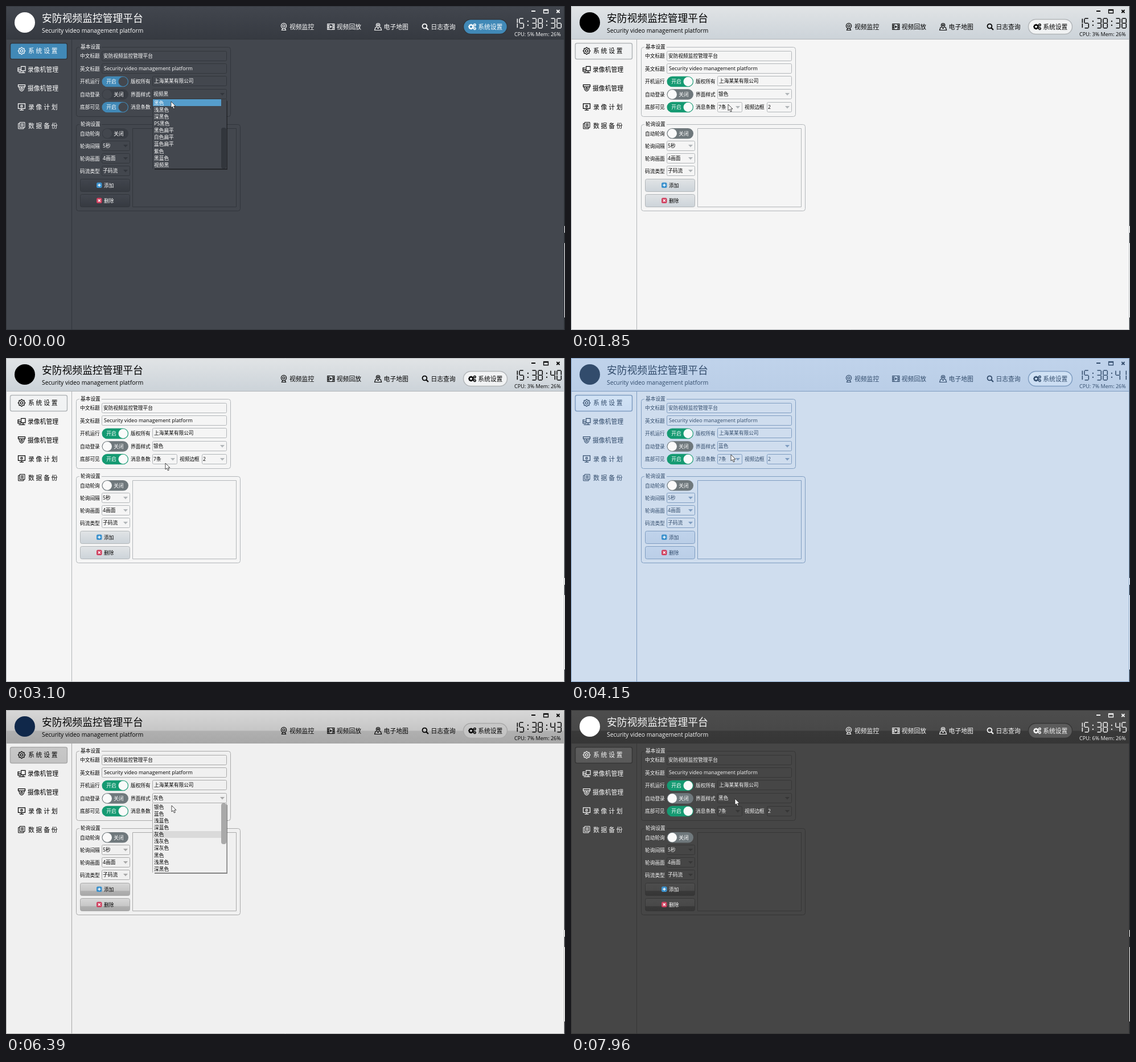
An HTML page with a canvas for the animation above (8000 ms loop, 982x570 px).

```html
<!DOCTYPE html>
<html lang="zh-CN">
<head>
<meta charset="utf-8">
<title>安防视频监控管理平台</title>
<style>
html, body { margin: 0; width: 100%; height: 100%; overflow: hidden; }
canvas { display: block; }
</style>
</head>
<body>
<canvas id="stage" width="982" height="570"></canvas>
<script>
const g = document.getElementById('stage').getContext('2d');
const LOOP = 8000, TAU = Math.PI * 2;
const FONT = '"Open Sans", "Noto Sans CJK SC", "Noto Sans CJK", sans-serif';
const STYLES = ['银色', '蓝色', '浅蓝色', '深蓝色', '灰色', '浅灰色', '深灰色', '黑色', '浅黑色',
  '深黑色', 'PS黑色', '黑色扁平', '白色扁平', '蓝色扁平', '紫色', '黑蓝色', '视频黑'];

// bar: header and button gradient, sel: selected item gradient
const base = { on: '#159a72', off: '#6f787c', knob: '#fafafa' };
const THEMES = {
  video: { name: '视频黑', text: '#ffffff', panel: '#43474e', line: '#32363c', bar: ['#42464e', '#363a41'],
    sel: ['#4189b7', '#4189b7'], hover: '#559dcc', logo: '#ffffff',
    on: '#4189b7', off: '#383c43', knob: '#43474e' },
  silver: { ...base, name: '银色', text: '#000000', panel: '#f5f5f5', line: '#b2b6b9', bar: ['#e1e4e6', '#ccd3d9'],
    sel: ['#f2f3f4', '#f0f2f3'], hover: '#e1e4e6', logo: '#000000' },
  blue: { ...base, name: '蓝色', text: '#324c6c', panel: '#cfddee', line: '#7f9dc1', bar: ['#c0d3eb', '#bacee7'],
    sel: ['#d2e3f5', '#cadcf2'], hover: '#dae8f7', logo: '#324c6c' },
  sky: { ...base, name: '浅蓝色', text: '#386487', panel: '#eaf7ff', line: '#c0dcf2', bar: ['#def0fe', '#c0def6'],
    sel: ['#def0fe', '#d4eafb'], hover: '#f2f9ff', logo: '#386487' },
  gray: { ...base, name: '灰色', text: '#000000', panel: '#f0f0f0', line: '#a9a9a9',
    bar: ['#d8d8d8', '#c6c6c6', '#b0b0b0', '#a8a8a8'],
    sel: ['#c8c8c8', '#c2c2c2'], hover: '#dadada', logo: '#10284a' },
  black: { ...base, name: '黑色', text: '#f6f6f6', panel: '#464646', line: '#363636',
    bar: ['#4d4d4d', '#484848', '#393939', '#363636'],
    sel: ['#5c5c5c', '#595959'], hover: '#5c5c5c', logo: '#ffffff' }
};

// each visit to the style list: opened, picked, style chosen
const VISITS = [[-500, 1580, 'silver'], [2130, 2980, 'blue'], [3490, 3900, 'sky'], [4550, 5580, 'gray'], [6250, 7420, 'black']];
const APPLY = 260, MOVE = 250, ROW = 12.15;
// pointer stops: arrival time, x, y
const STOPS = [[0, 290, 168], [1030, 287, 208], [1330, 276, 173], [2100, 280, 158], [2600, 280, 185], [3400, 282, 158],
  [3850, 281, 194], [4150, 281, 170], [4500, 290, 158], [5000, 296, 215], [6200, 291, 168], [6960, 290, 253], [7960, 288, 156]];
const CPU = [[0, 5], [1160, 3], [3610, 7], [7420, 6]];

let th;

const clamp = (v, lo, hi) => Math.max(lo, Math.min(hi, v));
const ease = p => p * p * (3 - 2 * p);

function mouse(t) {
  let [, x, y] = STOPS[0];
  for (const [end, tx, ty] of STOPS) {
    const p = ease(clamp((t - end) / MOVE + 1, 0, 1));
    x += (tx - x) * p;
    y += (ty - y) * p;
  }
  return [x, y];
}

function skin(t) {
  const done = VISITS.filter(v => v[1] + APPLY <= t).pop();
  return THEMES[done ? done[2] : 'video'];
}

function text(s, x, y, size = 8.7, color = th.text, align = 'left') {
  g.font = `${size}px ${FONT}`;
  g.textAlign = align;
  g.fillStyle = color;
  g.fillText(s, x, y + size * 0.37);
}

function fade(y0, y1, cols) {
  const gr = g.createLinearGradient(0, y0, 0, y1);
  const stops = cols.length > 2 ? [0, 0.62, 0.64, 1] : [0, 1];
  cols.forEach((c, i) => gr.addColorStop(stops[i], c));
  return gr;
}

function rect(x, y, w, h, color) {
  g.fillStyle = color;
  g.fillRect(x, y, w, h);
}

function round(x, y, w, h, r, color) {
  g.fillStyle = color;
  g.beginPath();
  g.roundRect(x, y, w, h, r);
  g.fill();
}

function box(x0, y0, x1, y1, r, fill, line, w = 1) {
  g.beginPath();
  g.roundRect(x0 + 0.5, y0 + 0.5, x1 - x0 - 1, y1 - y0 - 1, r);
  if (fill) { g.fillStyle = fill; g.fill(); }
  if (line) { g.strokeStyle = line; g.lineWidth = w; g.stroke(); }
}

function disc(x, y, r, color) {
  g.fillStyle = color;
  g.beginPath();
  g.arc(x, y, r, 0, TAU);
  g.fill();
}

function ring(x, y, r, w = 1.2) {
  g.lineWidth = w;
  g.beginPath();
  g.arc(x, y, r, 0, TAU);
  g.stroke();
}

function path(d, w = 1.2) {
  g.lineWidth = w;
  g.stroke(new Path2D(d));
}

// closed wavy ring with n teeth
function gear(x, y, r, n, w) {
  g.lineWidth = w;
  g.beginPath();
  for (let i = 0; i < n * 6; i++) {
    const a = i / (n * 6) * TAU, d = r * (1 + 0.14 * Math.cos(a * n));
    g.lineTo(x + d * Math.cos(a), y + d * Math.sin(a));
  }
  g.closePath();
  g.stroke();
}

const ICONS = {
  webcam() { ring(0, -1.5, 4.6); ring(0, -1.5, 2); path('M-2 3L-3.5 6H3.5L2 3'); },
  film() {
    path('M-6 -5H6V5H-6ZM-3.5 -5V5M3.5 -5V5M-6 -1.7H-3.5M-6 1.7H-3.5M3.5 -1.7H6M3.5 1.7H6');
    g.fill(new Path2D('M-1.5 -2.5L2 0L-1.5 2.5Z'));
  },
  map() { path('M0 3C-5 -2 -3.5 -6 0 -6S5 -2 0 3ZM-3 1H-4.5L-6 6H6L4.5 1H3'); ring(0, -2.6, 1.3); },
  search() { ring(-1, -1, 3.9, 1.8); path('M2 2L5.5 5.5', 2.2); },
  gears() { gear(-2.2, 0, 3.4, 8, 2.1); gear(4.2, -3.2, 1.8, 6, 1.3); gear(4.2, 3.2, 1.8, 6, 1.3); },
  gear() { gear(0, 0, 5.4, 8, 1.2); ring(0, 0, 2.2); },
  recorder() { path('M-1 -5.5H6.5V2H-1ZM-3 -3H-6.5V3H-1M-6.5 0H-1M-5 5.5H6M2.5 2V5.5'); },
  dome() { path('M-6 -6H6V-2.5H-6ZM-4.5 -2.5C-4.5 7.5 4.5 7.5 4.5 -2.5'); ring(0, 0.8, 1.6); },
  monitor() { path('M-6 -5.5H6V3H-6ZM-3.5 5.7H3.5M0 3V5.7'); ring(0, -1.2, 1.6); },
  copy() { path('M-3.5 -5.5H5.5V3.5H-3.5ZM-3.5 -3.5H-5.8V5.7H3.5V3.5M-1.5 -3H3.5M-1.5 -1H3.5M-1.5 1H3.5', 1); }
};

function icon(name, x, y) {
  g.save();
  g.translate(x, y);
  g.strokeStyle = g.fillStyle = th.text;
  ICONS[name]();
  g.restore();
}

// segments: top, upper left, upper right, middle, lower left, lower right, bottom
const SEGS = ['M.6 0H6.8', 'M0 .6V7.9', 'M7.4 .6V7.9', 'M.6 8.5H6.8', 'M0 9.1V16.4', 'M7.4 9.1V16.4', 'M.6 17H6.8'];
const DIGITS = ['012456', '25', '02346', '02356', '1235', '01356', '013456', '025', '0123456', '012356'];

function clock(str) {
  g.strokeStyle = th.text;
  [...str].forEach((ch, i) => {
    g.save();
    g.translate(890.9 + 11 * i, 21.8);
    if (ch === ':') for (const y of [4, 11]) rect(3, y, 2, 2, th.text);
    else for (const s of DIGITS[ch]) path(SEGS[s], 1.5);
    g.restore();
  });
}

function field(x0, x1, y, s, inset = 3, size) {
  box(x0, y - 9, x1, y + 9, 2, null, th.line);
  text(s, x0 + inset, y, size);
}

function combo(x0, x1, y, s) {
  field(x0, x1, y, s, 2);
  g.fillStyle = th.line;
  g.beginPath();
  g.moveTo(x1 - 12, y - 2);
  g.lineTo(x1 - 4, y - 2);
  g.lineTo(x1 - 8, y + 2.5);
  g.fill();
}

function toggle(y, on) {
  round(168.5, y - 9.3, 46.5, 18.6, 9.3, on ? th.on : th.off);
  disc(on ? 205.7 : 177.8, y, 8.2, th.knob);
  text(on ? '开启' : '关闭', on ? 185 : 198, y, 8.7, '#ffffff', 'center');
}

function group(x1, y0, y1, title) {
  box(123, y0, x1, y1, 4, null, th.line);
  rect(129, y0 - 3, 39, 7, th.panel);
  text(title, 131, y0);
}

function button(y, s, color, mark) {
  box(130, y - 11.5, 218, y + 11.5, 3, fade(y - 11, y + 11, th.bar), th.line);
  round(159, y - 5, 9.5, 9.5, 2.5, color);
  g.strokeStyle = '#ffffff';
  g.save();
  g.translate(163.8, y - 0.2);
  path(mark, 1.4);
  g.restore();
  text(s, 172, y);
}

function header(t) {
  rect(0, 0, 981, 58, fade(0, 58, th.bar));
  disc(33, 29, 18, th.logo);
  text('安防视频监控管理平台', 63, 21, 17.8);
  text('Security video management platform', 63, 43, 10.3);

  box(803, 23, 881, 50, 13, fade(23, 50, th.sel), th.line, 1.5);
  ['视频监控', '视频回放', '电子地图', '日志查询', '系统设置'].forEach((s, i) => {
    icon(['webcam', 'film', 'map', 'search', 'gears'][i], 488 + 82.8 * i, 36.5);
    text(s, 498 + 82.8 * i, 37, 10.8);
  });

  rect(923, 8, 7, 2, th.text);
  g.strokeStyle = th.text;
  path('M944.5 6.5H952.5V12.5H944.5ZM944 7.5H953', 1.3);
  path('M967.3 6.8L972.5 12M972.5 6.8L967.3 12', 1.9);

  clock('15:38:' + (37 + Math.floor((t - 150) / 965)));
  const load = CPU.filter(k => k[0] <= t).pop()[1];
  text(`CPU: ${load}% Mem: 26%`, 893, 49.5, 9.05);
}

function sidebar() {
  rect(0, 58, 981, 1, th.line);
  rect(115, 58, 1, 512, th.line);
  box(7, 65, 108, 94, 3, fade(65, 94, th.sel), th.line, 1.5);
  ['系 统 设 置', '录像机管理', '摄像机管理', '录 像 计 划', '数 据 备 份'].forEach((s, i) => {
    const y = 79 + 32.8 * i;
    icon(['gear', 'recorder', 'dome', 'monitor', 'copy'][i], 27.5, y);
    text(s, s.includes(' ') ? 39 : 38, y + 0.5, 10.8);
  });
}

function form() {
  const top = i => 88 + 22.5 * i, low = i => 224.3 + 22.1 * i;
  group(395, 72, 195, '基本设置');
  group(412, 208, 361, '轮询设置');
  ['中文标题', '英文标题', '开机运行', '自动登录', '底部可见'].forEach((s, i) => text(s, 130, top(i)));
  ['版权所有', '界面样式', '消息条数'].forEach((s, i) => text(s, 219, top(i + 2)));
  ['自动轮询', '轮询间隔', '轮询画面', '码流类型'].forEach((s, i) => text(s, 130, low(i)));
  text('视频边框', 305, top(4));

  field(168, 388, 88, '安防视频监控管理平台');
  field(168, 388, 110, 'Security video management platform', 4, 9);
  field(257, 388, 132, '上海某某有限公司');
  combo(257, 388, 155, th.name);
  combo(257, 301, 178, '7条');
  combo(344, 388, 178, '2');
  ['5秒', '4画面', '子码流'].forEach((s, i) => combo(168, 218, 246 + 22 * i, s));
  toggle(top(2), true);
  toggle(top(3), false);
  toggle(top(4), true);
  toggle(low(0), false);
  button(315.5, '添加', '#3d92cd', 'M-2.5 0H2.5M0 -2.5V2.5');
  button(342.5, '删除', '#d0405f', 'M-2 -2L2 2M2 -2L-2 2');
  box(222, 215, 405, 354, 0, null, th.line);
}

function popup(t, opened, y) {
  // wheel ticks bring the list back to its top
  const first = clamp(7 - 4 * Math.floor((t - 310) / 150), 0, 7);
  const current = STYLES.indexOf(th.name) - first;
  const row = t - opened < 300 ? current : clamp(Math.floor((y - 164) / ROW), 0, 9);
  rect(261, 167, 128, 121, 'rgba(0,0,0,.45)');
  rect(257, 164, 131, 122, th.line);
  rect(258, 164, 129, 122, th.panel);
  rect(258, Math.round(164 + row * ROW), 120, 12, th.hover);
  for (let i = 0; i < 10; i++) text(STYLES[first + i], 260, 170.3 + i * ROW);
  round(378, 164 + first / 7 * 50, 9, 72, 4, th.line);
}

function pointer(x, y) {
  g.save();
  g.translate(x, y);
  const p = new Path2D('M0 0V11L2.5 8.8L4.4 13L6.3 12.1L4.5 8.1H8Z');
  g.fillStyle = '#ffffff';
  g.fill(p);
  g.strokeStyle = '#1c1c1c';
  g.lineWidth = 0.8;
  g.stroke(p);
  g.restore();
}

// sliver of desktop showing right of the window
function edge() {
  rect(981, 0, 1, 570, '#262a2e');
  rect(981, 387, 1, 12, '#ffffff');
  rect(981, 417, 1, 131, '#ffffff');
}

function draw(t) {
  th = skin(t);
  rect(0, 0, 982, 570, th.panel);
  header(t);
  sidebar();
  form();
  box(0, 0, 981, 570, 0, null, th.line);
  edge();
  const [x, y] = mouse(t);
  const visit = VISITS.find(v => v[0] <= t && t < v[1]);
  if (visit) popup(t, visit[0], y);
  pointer(x, y);
}

function tick() {
  draw(performance.now() % LOOP);
  requestAnimationFrame(tick);
}
tick();
</script>
</body>
</html>
```
